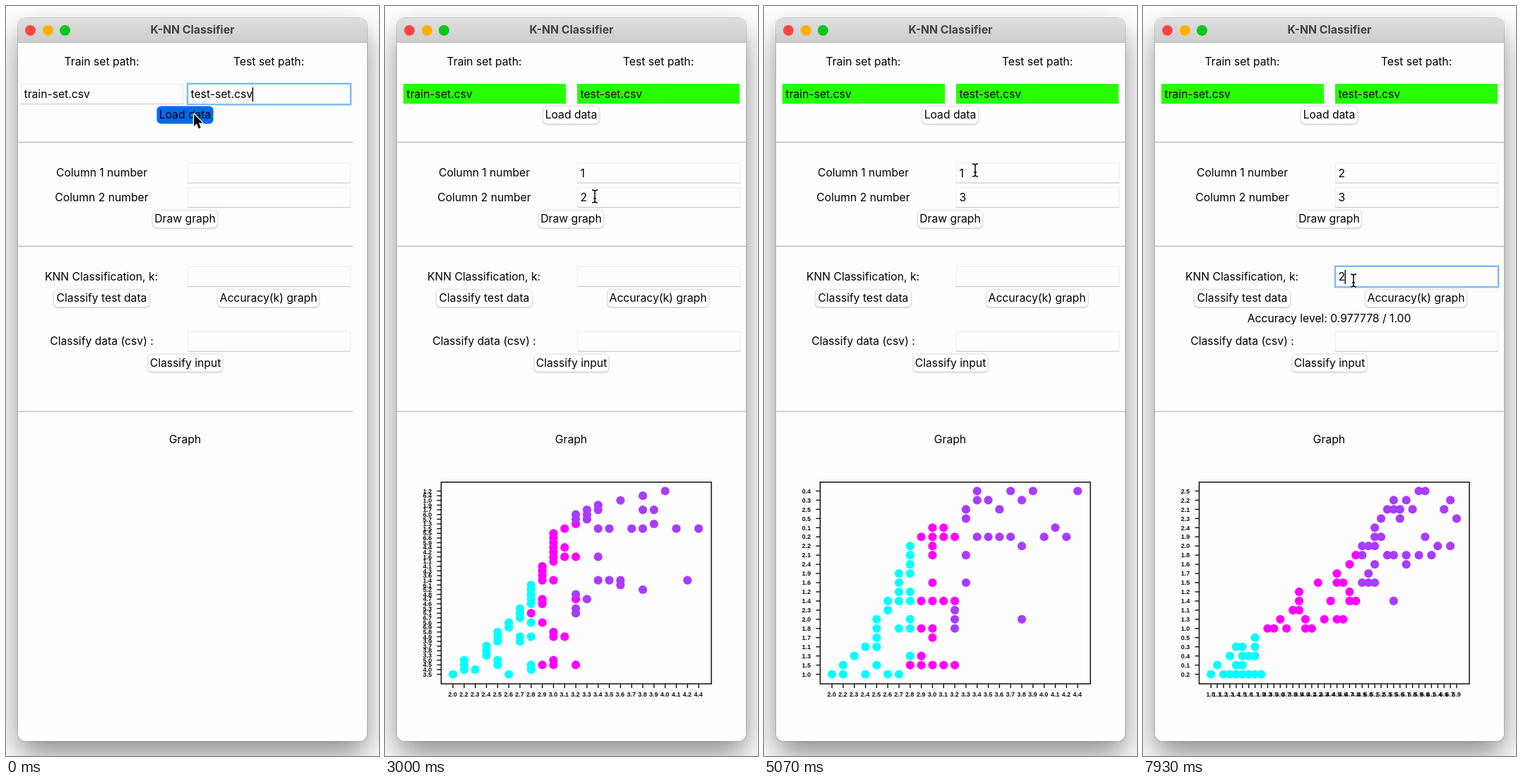
Recreate the animation shown at these times as an HTML page with a canvas. Size 528 by 1060 pixels, loop 8 s.

```html
<!DOCTYPE html>
<html lang="en">
<head>
<meta charset="utf-8">
<title>K-NN Classifier</title>
<style>
html, body { margin: 0; width: 528px; height: 1060px; overflow: hidden; background: #fff; }
#win {
  position: absolute; left: 17px; top: 17px; width: 494px; height: 1022px;
  border-radius: 11px; background: #fdfdfd; overflow: hidden;
}
#shade {
  position: absolute; left: 17px; top: 17px; width: 494px; height: 1022px; border-radius: 11px;
  box-shadow: 0 0 0 1px rgba(0,0,0,.16), 0 20px 44px rgba(0,0,0,.45);
}
#bar {
  height: 34px; border-bottom: 1px solid #bcbcbc;
  background: linear-gradient(#dedede, #cdcdcd);
  font: 700 15.8px/34px Inter, sans-serif; color: #434343; text-align: center;
}
#bar i { position: absolute; top: 9.5px; width: 15px; height: 15px; border-radius: 50%; }
canvas { position: absolute; left: 0; top: 0; }
</style>
</head>
<body>
<div id="shade"></div>
<div id="win"><div id="bar">
  <i style="left:10px;background:#ff4543"></i>
  <i style="left:34.5px;background:#ffb000"></i>
  <i style="left:59px;background:#06c51b"></i>K-NN Classifier
</div></div>
<canvas id="stage" width="528" height="1060"></canvas>
<script>
const ctx = document.getElementById('stage').getContext('2d');
const LOOP = 8000, BG = '#fdfdfd';
const FONT = '15.7px Inter, sans-serif';
const TICK_FONT = 'bold 9px "Liberation Sans", Arial, sans-serif';
const COLORS = ['#00ffff', '#ff00ff', '#a83cff'];

// Consecutive tick labels, e.g. span(2.2, 4.2)
const span = (a, b) => {
  const out = [];
  for (let v = Math.round(a * 10); v <= Math.round(b * 10); v++) out.push((v / 10).toFixed(1));
  return out;
};
const words = s => s.split(' ');

const widths = ['2.0', ...span(2.2, 4.2), '4.4'];
const lengths = [...span(1, 1.7), '1.9', '3.3', ...span(3.5, 5.3), ...span(5.5, 6.1), '6.4', '6.6', '6.7', '6.9'];

// Points are "column:rows" by tick index, one line per class
const graphs = [
  {
    xs: widths,
    ys: words('3.5 4.0 4.5 5.0 3.3 3.8 3.7 3.9 4.9 5.8 6.9 5.6 6.7 5.1 5.3 4.6 4.7 4.8 5.2 6.1 ' +
      '1.4 3.6 4.3 4.1 1.1 1.6 4.2 4.4 5.9 6.6 5.5 1.5 1.3 5.7 6.0 1.7 1.9 1.0 6.4 1.2'),
    points: [
      '0:0 1:1-3 2:1 3:4-6 4:2-3,7-9 5:0,10-11 6:7-8,12-14 7:1-2,8,11,15-19',
      '7:13 8:2,11,15-16,20-23 9:2-3,8-9,20,24-30 10:8,25,27,31 11:2,16,25,32',
      '11:13-14,17,33-34 12:16,33-35 13:20,25,31,35-36 14:20,31 15:19-20,37 16:31 ' +
        '17:18,31,35,38 18:32,35 19:39 20:31 21:20 22:31'
    ]
  },
  {
    xs: widths,
    ys: words('1.0 1.5 1.3 1.1 1.7 1.8 2.0 2.3 1.4 1.2 1.6 1.9 2.4 2.1 2.2 0.2 0.1 0.5 2.5 0.3 0.4'),
    points: [
      '0:0 1:0-1 2:2 3:0,3 4:1,3-6 5:0,7-8 6:0,5,8-11 7:2,5-6,8-9,11-14',
      '7:1 8:1-2,5,8,15 9:1,4-5,8,10,13-16 10:1,8,15-16 11:1,8,15',
      '11:5-7 12:10,13,17-18 13:15,19-20 14:15,19 15:15,18 16:15,20 17:6,14,19 18:20 19:15 20:16 21:15 22:20'
    ]
  },
  {
    xs: lengths,
    ys: words('0.2 0.1 0.4 0.3 0.5 1.0 1.3 1.1 1.4 1.2 1.5 1.7 1.6 1.8 2.0 1.9 2.4 2.3 2.1 2.2 2.5'),
    points: [
      '0:0 1:1 2:0 3:0,2 4:0-1,3 5:0-3 6:0,2 7:0,2-4 8:0',
      '9:5 10:5 11:6 12:5 13:7 14:7-9 15:5-6 16:5 17:10 18:6 19:8 20:6,10-11 21:6,10 22:8-9,12 23:8,13',
      '24:10,13-14 25:10-11,14 26:10,12,14-16 27:15,17 28:13,18 29:8,13,18-19 30:17-18 31:12-13,19 ' +
        '32:18 33:13,20 34:15,20 35:13 36:14 37:18 38:14,19 39:17'
    ]
  }
];

// Times of hard changes: [start, value]
const at = (list, t) => list.filter(e => e[0] <= t).pop()[1];
const within = (t, ...spans) => spans.some(([a, b]) => t >= a && t < b);

const focusTimes = [[0, 'test'], [600, 'col1'], [1070, 'col2'], [2200, ''], [3130, 'col2'], [4470, ''],
  [5130, 'col1'], [6200, ''], [6530, 'knn']];
const col1Times = [[0, ''], [930, '1'], [5450, '2']];
const col2Times = [[0, ''], [1330, '2'], [3530, '3']];
const knnTimes = [[0, ''], [6870, '2']];
const graphTimes = [[0, -1], [2200, 0], [4470, 1], [6200, 2]];

// Pointer stops: arrival, departure, x, y
const stops = [[0, 70, 266, 153], [560, 1400, 290, 229], [1780, 2300, 259, 304], [2900, 3550, 297, 269],
  [4000, 4500, 259, 304], [5000, 5500, 299, 232], [5800, 6220, 259, 304], [6480, 6900, 307, 372],
  [7200, 7480, 140, 412], [7870, 8000, 298, 388]];

function pointer(t) {
  const i = stops.findIndex((s, k) => k === stops.length - 1 || t < stops[k + 1][0]);
  const [, leave, x, y] = stops[i];
  if (t <= leave || i === stops.length - 1) return [x, y];
  const [arrive, , nx, ny] = stops[i + 1];
  const p = (t - leave) / (arrive - leave), e = p * p * (3 - 2 * p);
  return [x + (nx - x) * e, y + (ny - y) * e];
}

function rect(x, y, w, h, color) {
  ctx.fillStyle = color;
  ctx.fillRect(x, y, w, h);
}

function text(s, x, y, align = 'center') {
  ctx.font = FONT;
  ctx.textAlign = align;
  ctx.fillStyle = '#000';
  ctx.fillText(s, x, y);
}

function label(s, cx, cy) {
  ctx.font = FONT;
  const w = ctx.measureText(s).width;
  rect(cx - w / 2 - 5, cy - 11, w + 10, 22, BG);
  text(s, cx, cy + 5.7);
}

function button(s, cx, y, w, pressed) {
  const x = cx - w / 2;
  rect(x - 2, y - 1, w + 4, 28, BG);
  ctx.beginPath();
  ctx.roundRect(x + .5, y + .5, w - 1, 25, 6);
  if (pressed) {
    ctx.fillStyle = '#0069f2';
    ctx.fill();
  } else {
    ctx.save();
    ctx.shadowColor = 'rgba(0,0,0,.28)';
    ctx.shadowBlur = 2;
    ctx.shadowOffsetY = 1;
    ctx.fillStyle = '#fff';
    ctx.fill();
    ctx.restore();
    ctx.strokeStyle = '#dedede';
    ctx.lineWidth = 1;
    ctx.stroke();
  }
  text(s, cx, y + 18.2);
}

function entry(s, x, y, { green, focused } = {}) {
  rect(x - 3.5, y - 2, 237, 33, BG);
  if (green) rect(x, y, 230, 28, '#27ff00');
  else {
    ctx.strokeStyle = '#ececec';
    ctx.lineWidth = 1;
    ctx.strokeRect(x + .5, y + .5, 230, 28);
    rect(x, y + 28, 231, 1, '#c3c3cf');
  }
  if (focused) {
    ctx.strokeStyle = '#80bbf6';
    ctx.lineWidth = 2.5;
    ctx.strokeRect(x, y - .2, 231, 29.4);
  }
  text(s, x + 4.5, y + 20, 'left');
  if (focused) rect(x + 4 + ctx.measureText(s).width, y + 5, 1.4, 20, '#000');
}

function form(t, wide) {
  const left = wide ? 140.5 : 135.5, mid = wide ? 263.5 : 253.5, right = wide ? 387 : 372;
  const in1 = wide ? 26 : 21, in2 = wide ? 272 : 257;
  const focus = at(focusTimes, t), green = t >= 200;

  for (const y of [192, 339, 572.5]) rect(17, y, wide ? 494 : 474, 1.2, '#b2b2bd');

  label('Train set path:', left, 78);
  label('Test set path:', right, 78);
  entry('train-set.csv', in1, 110, { green });
  entry('test-set.csv', in2, 110, { green, focused: focus === 'test' });
  button('Load data', mid, 141, 81, t < 140);

  label('Column 1 number', left, 235);
  label('Column 2 number', left, 270);
  entry(at(col1Times, t), in2, 221.5, { focused: focus === 'col1' });
  entry(at(col2Times, t), in2, 256, { focused: focus === 'col2' });
  button('Draw graph', mid, 288, 93, within(t, [1930, 2200], [4130, 4330], [5870, 6070]));

  label('KNN Classification, k:', left - .5, 382);
  entry(at(knnTimes, t), in2, 368, { focused: focus === 'knn' });
  button('Classify test data', left, 400, 137, within(t, [7270, 7400]));
  button('Accuracy(k) graph', right - .5, 400, 145);
  if (t >= 7400) label('Accuracy level: 0.977778 / 1.00', mid, 441);

  label('Classify data (csv) :', left, 473.5);
  entry('', in2, 459.5);
  button('Classify input', mid + .5, 491.5, 107);
  label('Graph', mid, 612.5);
}

function chart({ xs, ys, points }) {
  const px = i => 96.2 + i * 347.8 / (xs.length - 1);
  const py = i => 944.5 - i * 259 / (ys.length - 1);

  points.forEach((line, k) => {
    ctx.fillStyle = COLORS[k];
    for (const group of words(line)) {
      const [col, rows] = group.split(':');
      for (const run of rows.split(',')) {
        const [from, to = from] = run.split('-').map(Number);
        for (let row = from; row <= to; row++) {
          ctx.beginPath();
          ctx.arc(px(+col), py(row), 6.1, 0, 7);
          ctx.fill();
        }
      }
    }
  });

  ctx.strokeStyle = '#000';
  ctx.lineWidth = 1.4;
  ctx.strokeRect(79.5, 673, 382.5, 285);
  ctx.font = TICK_FONT;
  ctx.fillStyle = '#111';
  ctx.textAlign = 'center';
  xs.forEach((s, i) => {
    ctx.fillRect(px(i) - .7, 958, 1.4, 6);
    ctx.fillText(s, px(i) - .5, 976);
  });
  ctx.textAlign = 'right';
  ys.forEach((s, i) => {
    ctx.fillRect(73.5, py(i) - .7, 6, 1.4);
    ctx.fillText(s, 66.3, py(i) + 3.2);
  });
}

function outlined(path, width) {
  ctx.lineJoin = 'round';
  ctx.strokeStyle = '#fff';
  ctx.lineWidth = width;
  ctx.stroke(path);
}

const arrow = new Path2D('M0 0V17L4 13.3L6.8 20.2L9.7 19L6.9 12.3H12.4Z');
const beam = new Path2D('M-4 -9Q0 -9 0 -6.5Q0 -9 4 -9M0 -6.5V6.5M-4 9Q0 9 0 6.5Q0 9 4 9M-2 3H2');

function drawPointer(t) {
  const [x, y] = pointer(t);
  const overEntry = x > 257 && [109, 222, 256, 368, 460].some(top => y >= top && y < top + 29);
  ctx.save();
  ctx.translate(x, y);
  if (overEntry) {
    outlined(beam, 3);
    ctx.strokeStyle = '#000';
    ctx.lineWidth = 1.5;
    ctx.stroke(beam);
  } else {
    outlined(arrow, 2.6);
    ctx.fillStyle = '#000';
    ctx.fill(arrow);
  }
  ctx.restore();
}

function frame(now) {
  const t = now % LOOP, g = at(graphTimes, t);
  ctx.clearRect(0, 0, 528, 1060);
  // While a graph is rebuilt, the narrow layout shows through behind the wide one
  if (g < 0 || within(t, [4330, 4470], [6070, 6200])) form(t, false);
  if (g >= 0) {
    form(t, true);
    chart(graphs[g]);
  }
  drawPointer(t);
}

const start = performance.now();
(function tick() {
  frame(performance.now() - start);
  requestAnimationFrame(tick);
})();
</script>
</body>
</html>
```
